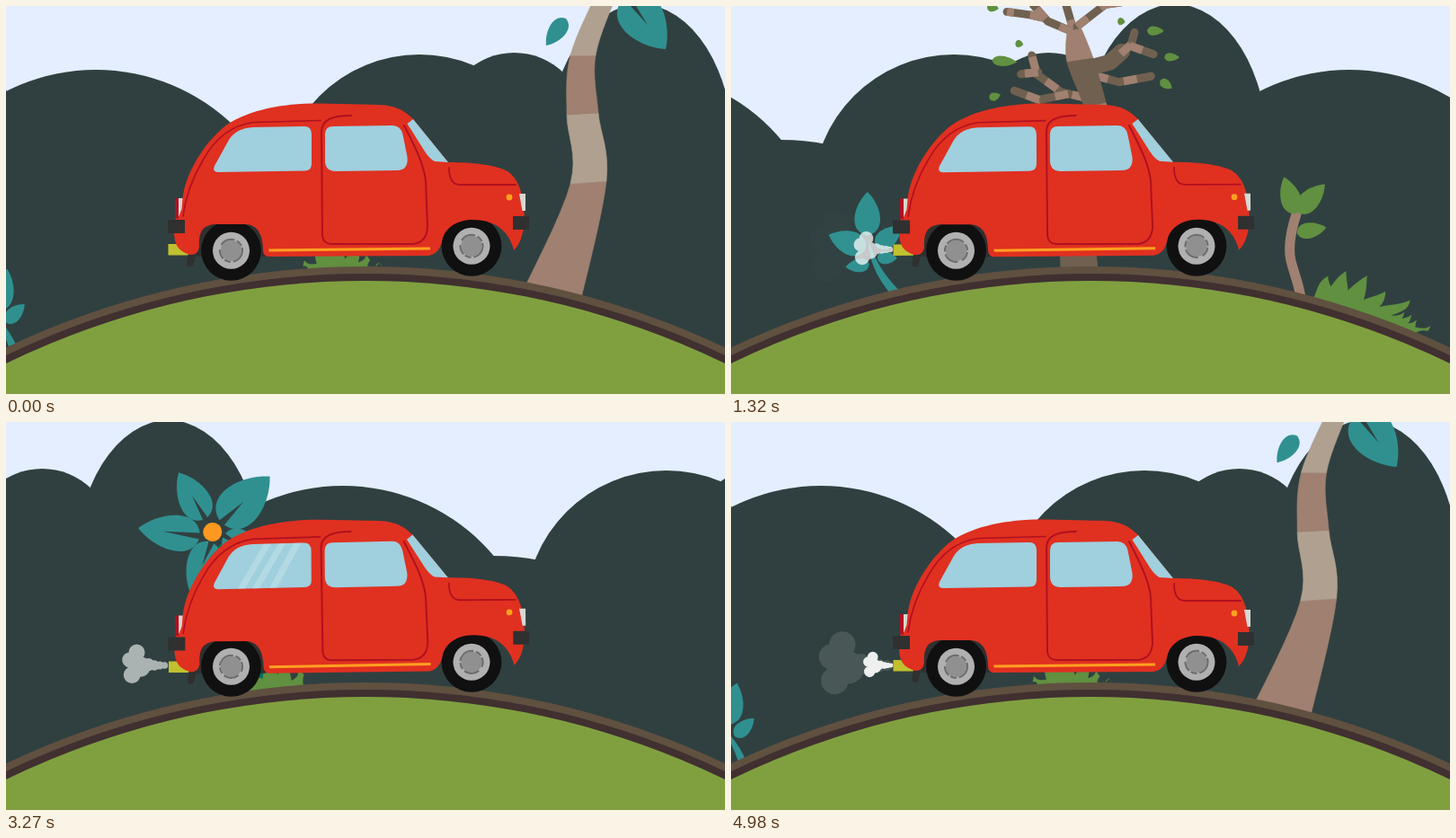
These frames come from a looping animation (800 by 432 pixels, 5.01 s). An HTML page with a canvas:

```html
<!DOCTYPE html>
<html lang="en">
<head>
<meta charset="utf-8">
<title>Little red car</title>
<style>
html, body { margin: 0; width: 100%; height: 100%; overflow: hidden; background: #e4eeff; }
canvas { display: block; width: 800px; height: 432px; }
</style>
</head>
<body>
<canvas id="stage" width="800" height="432"></canvas>
<script>
const c = document.getElementById('stage').getContext('2d');
const LOOP = 5010, STEP = 30, RAD = Math.PI / 180;
const CX = 400, CY = 1222, R = 932;      // the hill the car drives on
const SPEED = 33.45 / 1000, REPEAT = 166.9;
const SKY = '#e4eeff', HILL = '#304040', TEAL = '#309090', GREEN = '#609040',
  PINK = '#a08070', TAN = '#b0a090', BARK = '#706050',
  RED = '#e03020', DEEP = '#b01020', GLASS = '#a0cfde', DARK = '#303030';

function disc(x, y, r, color) {
  c.fillStyle = color;
  c.beginPath();
  c.arc(x, y, r, 0, 7);
  c.fill();
}

function shape(d, color) {
  c.fillStyle = color;
  c.fill(new Path2D(d));
}

function line(d, color, width) {
  c.strokeStyle = color;
  c.lineWidth = width;
  c.lineCap = 'round';
  c.lineJoin = 'round';
  c.stroke(new Path2D(d));
}

function spin(x, y, angle, draw) {
  c.save();
  c.translate(x, y);
  c.rotate(angle);
  c.translate(-x, -y);
  draw();
  c.restore();
}

// A leaf from stalk to tip, with an optional slit at the stalk.
function leaf(x, y, tx, ty, w, color, slit = 0) {
  const len = Math.hypot(tx - x, ty - y), g = slit ? len * 0.05 : 0;
  c.save();
  c.translate(x, y);
  c.rotate(Math.atan2(ty - y, tx - x));
  c.fillStyle = color;
  c.beginPath();
  c.moveTo(0, -g);
  c.bezierCurveTo(len * 0.1, -w * 0.8, len * 0.7, -w * 0.55, len, 0);
  c.bezierCurveTo(len * 0.7, w * 0.55, len * 0.1, w * 0.8, 0, g);
  if (slit) c.lineTo(len * slit, 0);
  c.fill();
  c.restore();
}

const spline = (a, b, d, e, u) =>
  0.5 * (2 * b + (d - a) * u + (2 * a - 5 * b + 4 * d - e) * u * u + (3 * b - a - 3 * d + e) * u * u * u);

// Rows hold left and right edge points; bands between rows alternate in colour.
function trunk(rows, colors) {
  const n = rows.length - 1;
  for (let i = 0; i < n; i++) {
    const q = [rows[Math.max(0, i - 1)], rows[i], rows[i + 1], rows[Math.min(n, i + 2)]];
    const at = (k, u) => spline(q[0][k], q[1][k], q[2][k], q[3][k], u);
    c.beginPath();
    for (let s = 0; s <= 8; s++) c.lineTo(at(0, s / 8), at(1, s / 8));
    for (let s = 8; s >= 0; s--) c.lineTo(at(2, s / 8), at(3, s / 8));
    c.closePath();
    c.fillStyle = c.strokeStyle = colors[i % 2];
    c.lineWidth = 0.6;
    c.fill();
    c.stroke();
  }
}

const groundY = x => CY - Math.sqrt(R * R - (x - CX) ** 2);

// Blades: foot x, tip x, tip y.
function grass(blades, w) {
  c.fillStyle = GREEN;
  for (const [x, tx, ty] of blades) {
    const l = x - w / 2, r = x + w / 2, ly = groundY(l) + 4, ry = groundY(r) + 4;
    c.beginPath();
    c.moveTo(l, ly);
    c.bezierCurveTo(l - 3, ly - 14, tx - w * 0.25, ty + 14, tx, ty);
    c.bezierCurveTo(tx + w * 0.45, ty + 12, r + 4, ry - 18, r, ry);
    c.fill();
  }
}

function tallTree() {
  trunk([[572, 324, 637, 338], [628, 198, 668, 195], [624, 121, 659, 119],
    [628, 55, 656, 55], [660, -20, 680, -14]], [PINK, TAN]);
  disc(670, -17, 10.5, TAN);
  leaf(623, 14, 601, 44, 19, TEAL);
  leaf(690, -11, 734, 48, 47, TEAL, 0.55);
}

function bareTree() {
  const limbs = [
    'M692 66L691 12L704 0M690 12L671 -8',
    'M690 64L667 46L656 24M663 41L650 34L626 24',
    'M697 60L735 44L742 24M736 45L753 47',
    'M685 139L661 126L640 100L640 78M642 98L623 95',
    'M668 130L635 128L611 111',
    'M702 118L726 132L762 135'
  ];
  const stripe = (d, w) => {
    line(d, BARK, w);
    c.setLineDash([15, 18]);
    c.lineCap = 'butt';
    c.strokeStyle = PINK;
    c.stroke(new Path2D(d));
    c.setLineDash([]);
  };
  limbs.forEach(d => stripe(d, 9));
  line('M696 108L722 108L738 100', BARK, 18);
  stripe('M736 102L750 95L757 83M748 96L771 112', 9);
  trunk([[606, 332, 647, 342], [621, 272, 658, 285], [651, 215, 686, 238], [674, 177, 703, 187],
    [681, 149, 706, 150], [676, 95, 705, 98], [685, 62, 701, 64]], [BARK, PINK]);
  const leaves = [[596, 72, 622, 81, 11], [582, 112, 595, 111, 9], [606, 13, 618, 18, 9],
    [642, 14, 651, 9, 8], [626, 60, 634, 64, 8], [742, 66, 750, 69, 8], [763, 46, 774, 49, 8],
    [754, 16, 772, 8, 10], [771, 85, 789, 90, 10], [782, 118, 798, 123, 9], [771, 142, 781, 154, 10],
    [682, -2, 691, 4, 7]];
  leaves.forEach(l => leaf(...l, GREEN));
}

function bigSprig() {
  shape('M752 366C750 338 754 318 768 299C760 320 758 340 762 366Z', TEAL);
  leaf(759, 306, 735, 269, 26, TEAL);
  leaf(769, 295, 798, 256, 28, TEAL);
  leaf(770, 311, 806, 309, 21, TEAL);
  leaf(752, 322, 729, 309, 15, TEAL);
  leaf(764, 321, 781, 335, 14, TEAL);
}

function smallSprig() {
  shape('M564 309C570 292 572 275 570 254C576 275 576 292 573 309Z', TEAL);
  leaf(578, 265, 614, 234, 27, TEAL);
  leaf(578, 281, 607, 277, 16, TEAL);
  leaf(564, 283, 537, 279, 15, TEAL);
  leaf(562, 272, 540, 241, 22, TEAL);
}

function flower() {
  shape('M709 174Q714 166 720 174C727 220 725 280 713 340L655 336C690 300 708 240 709 174Z', '#007060');
  leaf(711, 137, 706, 78, 33, TEAL, 0.5);
  leaf(726, 149, 796, 125, 45, TEAL, 0.45);
  leaf(722, 163, 752, 208, 32, TEAL, 0.45);
  leaf(706, 164, 661, 206, 34, TEAL, 0.45);
  leaf(697, 152, 639, 115, 38, TEAL, 0.6);
  disc(712, 154, 10.5, '#ff9820');
  grass([[665, 650, 301], [674, 666, 313], [686, 685, 316], [699, 704, 307], [711, 719, 317], [722, 733, 334]], 17);
}

function youngTree() {
  line('M396 300Q386 280 374 262T364 206', PINK, 11);
  leaf(363, 206, 340, 170, 22, GREEN);
  leaf(365, 204, 386, 166, 22, GREEN);
  leaf(370, 226, 400, 212, 17, GREEN);
}

// Each plant is drawn in the pose it has at its own moment.
const plants = [
  [0, tallTree],
  [0, () => grass([[345, 332, 283], [356, 346, 268], [369, 362, 254], [382, 388, 266], [393, 401, 277], [402, 415, 285]], 16)],
  [870, bareTree],
  [240, bigSprig],
  [1770, bigSprig],
  [1770, youngTree],
  [2520, () => grass([[22, 8, 347], [32, 20, 330], [46, 41, 319], [60, 68, 319], [75, 95, 309]], 20)],
  [2520, () => grass([[91, 99, 323], [101, 107, 320], [110, 115, 321], [117, 131, 316]], 11)],
  [2520, flower],
  [3930, smallSprig]
];

function drawPlants(t) {
  for (const [at, draw] of plants) {
    const a = (at - t) * SPEED + REPEAT * 1.5;
    spin(CX, CY, (a % REPEAT - REPEAT / 2) * RAD, draw);
  }
}

// Centre x, top y, half width, half height.
const hills = [[100, 71, 220, 220], [268, 149, 260, 260], [460, 54, 157, 157],
  [565.5, 52, 78.5, 78.5], [706, -2, 104, 166]];

function drawHills(t) {
  c.fillStyle = HILL;
  c.fillRect(0, 153.5, 800, 279);
  for (let k = -1; k < 3; k++) {
    for (const [x, y, a, b] of hills) {
      c.beginPath();
      c.ellipse(x + k * 800 - 800 * t / 4980, y + b, a, b, 0, 0, 7);
      c.fill();
    }
  }
}

const puff = [[-47, -19, 12], [-57, -8, 11.5], [-54, 14, 12.5], [-42, 2, 15], [-30, -1, 9.5],
  [-21, 0, 7.5], [-13, 0, 6], [-6, 0, 5]];

function drawSmoke(t) {
  const life = 630;
  for (let born = 230; born <= t; born += 470) {
    const age = t - born;
    if (age >= life) continue;
    const s = (28.5 + 0.104 * age) / 68;
    c.globalAlpha = Math.pow(1 - age / life, 1.2);
    c.fillStyle = '#fff';
    c.beginPath();
    for (const [x, y, r] of puff) {
      c.moveTo(181 + (x + r) * s, 271 + y * s);
      c.arc(181 + x * s, 271 + y * s, r * s, 0, 7);
    }
    c.fill();
  }
  c.globalAlpha = 1;
}

function wheel(x, y, t) {
  disc(x, y, 33.4, '#101010');
  disc(x, y, 20.5, '#b0b0b0');
  spin(x, y, t * 0.0126, () => {
    c.strokeStyle = '#6c6c6c';
    c.lineWidth = 2.4;
    c.lineCap = 'butt';
    c.setLineDash([17, 3, 7, 2, 11, 5]);
    c.beginPath();
    c.arc(x, y, 12.4, 0, 7);
    c.stroke();
    c.setLineDash([]);
  });
  disc(x, y, 11.6, '#909090');
}

const BODY = 'M187 250L188 240C190 227 196 217 197 211C201 184 222 150 246 132C272 115 310 108 350 108.5' +
  'L415 110C435 111 444 117 453 126L492 174C520 174 545 177 558 184C570 192 574 207 576 222L577 240' +
  'C575 256 572 265 565 272C562 258 552 245 538 241C530 238 520 237.5 512 238.5C497 241 487 250 485 262' +
  'Q482 276 470 278L292 279Q286 278 286 272C286 255 280 243 266 243L235 243C220 243 214 250 215 268' +
  'Q214 277 205 277C193 273 187 268 187 250Z';
const REAR_GLASS = 'M232 178L248 149Q256 136 275 135L332 134Q340 134 340 143L340 176Q340 183.500 332 183.500' +
  'L236 185Q229 185 232 178Z';

function drawBody(t) {
  shape(BODY, RED);
  shape('M188 214L194 214L192 237L188 236Z', DEEP);
  shape('M192 214L196.500 214L195.500 226L192 235Z', '#d8d8d4');
  shape('M571 209L578 209L578 228L574.500 228Z', '#d8d8d4');
  shape(REAR_GLASS, GLASS);
  shape('M355 143Q355 134 364 134L430 133Q439 133 441.500 143L446.500 168Q448 183 435 183L367 184Q355 184 355 172Z', GLASS);
  shape('M446.500 131L453 126L492 174L477 173Q472 171 466 162Z', GLASS);

  // glint on the rear window
  const glint = 1 - Math.abs(t % 2400 - 870) / 260;
  if (glint > 0) {
    c.save();
    c.clip(new Path2D(REAR_GLASS));
    c.globalAlpha = 0.2 * Math.min(1, glint * 1.5);
    line('M260 188L293 132M276 188L309 132M295 188L326 132', '#fff', 7);
    c.restore();
  }

  line('M350 127.500L275 129.500C250 133 232 149 220 170C208 190 200 210 197 234', DEEP, 1.6);
  line('M384 122C362 122 351 127 351 140L352 256Q353 264.500 362 265L452 265Q468 264 469 246L467 195' +
    'C465 175 454 155 443 133', DEEP, 2);
  line('M493 180Q493 199 505 199L567 199', DEEP, 1.8);
  shape('M292 270.500L472 268.500L472 271.500L293 273.500Z', '#ffa020');
  disc(560, 213, 3.4, '#ffa020');
  c.fillStyle = DARK;
  c.fillRect(180, 238, 19, 15);
  c.fillRect(564, 234, 18, 15);
}

function drawCar(t) {
  const tilt = -0.4 * (1 - Math.cos(2 * Math.PI * t / 622.5)) * RAD;
  const rock = draw => spin(400, 200, tilt, draw);
  rock(() => {
    shape('M180.500 265H204V277.500H180.500Z', '#c0c030');
    shape('M203 275L212 275L208 289Q204 292 201 288Z', DARK);
    shape('M212 240H289V279H212Z', DARK);
  });
  wheel(250.5, 272.3, t);
  wheel(518, 267.3, t);
  rock(() => drawBody(t));
}

function frame() {
  const t = Math.floor(performance.now() % LOOP / STEP) * STEP;
  c.fillStyle = SKY;
  c.fillRect(0, 0, 800, 432);
  drawHills(t);
  drawPlants(t);
  disc(CX, CY, R, '#605040');
  disc(CX, CY, R - 8, '#403030');
  disc(CX, CY, R - 16, '#80a040');
  drawSmoke(t);
  drawCar(t);
  requestAnimationFrame(frame);
}
frame();
</script>
</body>
</html>
```
